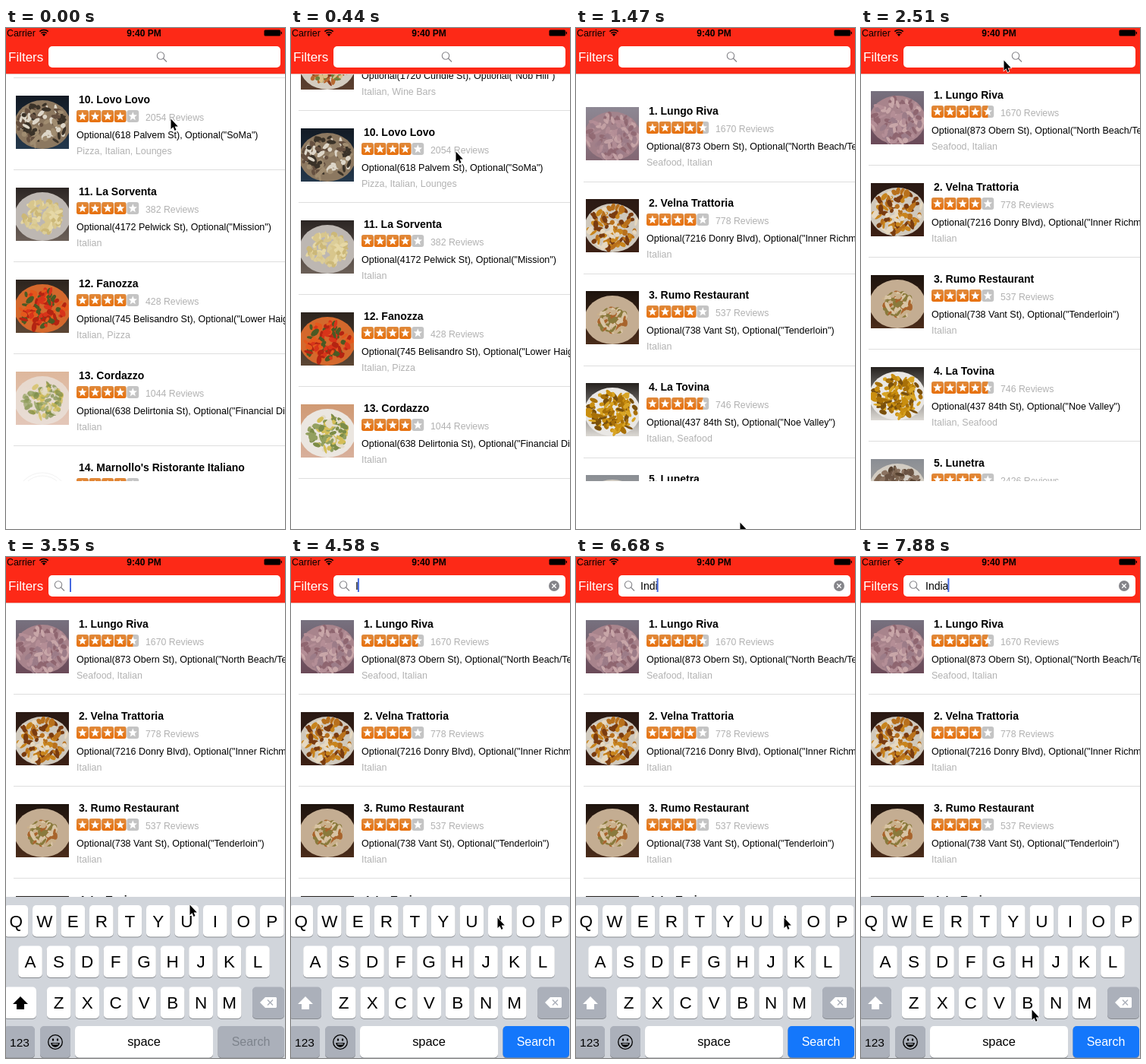
An HTML page with a canvas for the animation above (8 s loop, 368 px wide and 659 px high).

```html
<!DOCTYPE html>
<html lang="en">
<head>
<meta charset="utf-8">
<title>Restaurant search</title>
<style>
html, body { margin: 0; width: 368px; height: 659px; overflow: hidden; background: #fff; }
canvas { display: block; }
</style>
</head>
<body>
<canvas id="stage" width="368" height="659"></canvas>
<script>
const ctx = document.getElementById('stage').getContext('2d');
const LOOP = 8000, STEP = 148.5, ROW = 121, NAV = 60, LIST_END = 596;
const RED = '#fd2917', GREY = '#b2b2b2';

// name, reviews, rating, street, area, categories, photo: food radius, top, bottom, plate, food colours
const ROWS = [
  ['Lungo Riva', 1670, 4.5, '873 Obern St', 'North Beach/Telegraph Hill', 'Seafood, Italian', '34 #77717f #6b4a58 #a8848c #b48e96 #c8a6a8 #8f6670 #9c7c88'],
  ['Velna Trattoria', 778, 4, '7216 Donry Blvd', 'Inner Richmond', 'Italian', '33 #2a1a14 #3c2014 #cfc8bc #b8701c #7a3c10 #c8841c #e6d8c0'],
  ['Rumo Restaurant', 537, 4, '738 Vant St', 'Tenderloin', 'Italian', '18 #1e140e #4a2c1a #c4ad92 #c9b08c #a8642c #8a7a3c #d8c4a4'],
  ['La Tovina', 746, 4.5, '437 84th St', 'Noe Valley', 'Italian, Seafood', '32 #25211e #dcd9d4 #e9e7e4 #c98e10 #d8a424 #7a500c #a87008'],
  ['Lunetra', 2426, 4, '2366 Bolenira St', 'Mission', 'Italian, Bars, Pizza', '31 #8a8e94 #b9b2a8 #d2ccc2 #6b5444 #8a7260 #55402f #7c6450'],
  ['Valtorni Ristorante', 613, 4.5, '738 Obern St', 'North Beach/Telegraph Hill', 'Pizza, Italian', '33 #6c7078 #7a4c2c #d9bf8c #ead9ac #f2e6c6 #c89a5c #e4cc94'],
  ['Orvana Rosticceria', 96, 4.5, '263 McTindrill St', 'Civic Center', 'Italian, American (Traditional), Breakfast & Brunch', '31 #8c9098 #3a2018 #5c3826 #c89448 #84502c #6a7444 #4a2a1c'],
  ['Casa Verluna', 318, 4, '945 Tolmen St', 'Marina', 'Italian', '27 #4a3424 #6a4a30 #d8d0c4 #c08a40 #a85a24 #e0cc9c #6c7438'],
  ['Pontarello', 862, 4, '1720 Cundle St', 'Nob Hill', 'Italian, Wine Bars', '27 #3c2c24 #5c4030 #d4ccc0 #b86a30 #8a3c1c #dcc088 #70803c'],
  ['Lovo Lovo', 2054, 4, '618 Palvem St', 'SoMa', 'Pizza, Italian, Lounges', '32 #121a24 #24384c #8c7860 #ddd6c8 #3a3228 #a08c70 #655040'],
  ['La Sorventa', 382, 4, '4172 Pelwick St', 'Mission', 'Italian', '25 #2c2624 #6c6058 #bdb7b2 #d8c68c #e6d8a6 #ccb878 #dccd98'],
  ['Fanozza', 428, 4, '745 Belisandro St', 'Lower Haight', 'Italian, Pizza', '31 #2c241e #5c4634 #d4682c #d8341a #e4581c #4a5a24 #b42412'],
  ['Cordazzo', 1044, 4, '638 Delirtonia St', 'Financial District', 'Italian', '26 #d09a74 #d8b09c #ebe6e0 #7c8c48 #d4be58 #e4dcc8 #93a060'],
  ["Marnollo's Ristorante Italiano", 903, 4, '417 Tarnum St', 'North Beach', 'Italian', ''],
];

// list offset at each step; rests at 0 after the bounce
const SCROLL = [1083, 1078, 1070, 1040, 990, 880, 600, 306, 70, -45, -21.5, -8, -3, -1, 0];
// pointer: step, x, y
const POINTER = [[10, 216, 650], [12, 212, 560], [14, 196, 90], [15, 190, 38], [16, 188, 42], [19, 188, 42],
  [21, 192, 80], [24, 242, 457], [26, 272, 474], [30, 272, 474], [33, 256, 582], [35, 256, 582], [37, 109, 523],
  [39, 107, 522], [43, 272, 474], [45, 274, 474], [48, 50, 522], [49, 32, 524], [50, 32, 524], [53, 225, 595]];
const WORD = 'India', TYPED = [29, 35, 39, 44, 50];
const KEYS = [['QWERTYUIOP', 13.3, 458], ['ASDFGHJKL', 32, 511.5], ['ZXCVBNM', 69.7, 565.5]];

const clamp = v => Math.max(0, Math.min(1, v));

function text(str, x, y, size, color, align = 'left', weight = '') {
  ctx.font = `${weight} ${size}px "Liberation Sans", Arial, sans-serif`;
  ctx.textAlign = align;
  ctx.fillStyle = color;
  ctx.fillText(str, x, y);
}
function box(x, y, w, h, r, color) {
  ctx.fillStyle = color;
  ctx.beginPath();
  ctx.roundRect(x, y, w, h, r);
  ctx.fill();
}
function oval(x, y, rx, ry, color, turn = 0) {
  ctx.fillStyle = color;
  ctx.beginPath();
  ctx.ellipse(x, y, rx, ry, turn, 0, 7);
  ctx.fill();
}
function poly(points, fill) {
  ctx.beginPath();
  points.forEach(([x, y]) => ctx.lineTo(x, y));
  ctx.closePath();
  ctx.fillStyle = fill;
  ctx.fill();
}
function line(color, width, ...points) {
  ctx.strokeStyle = color;
  ctx.lineWidth = width;
  ctx.beginPath();
  points.forEach(([x, y]) => ctx.lineTo(x, y));
  ctx.stroke();
}
function arc(x, y, r, from, to, color, width) {
  ctx.strokeStyle = color;
  ctx.lineWidth = width;
  ctx.beginPath();
  ctx.arc(x, y, r, from, to);
  ctx.stroke();
}
function clipped(x, y, w, h, draw) {
  ctx.save();
  ctx.beginPath();
  ctx.rect(x, y, w, h);
  ctx.clip();
  draw();
  ctx.restore();
}

function scrollAt(step) { return SCROLL[step] ?? 0; }

// step at which row n comes into view
function enterStep(n) {
  if (n > 12) return n === 13 ? -1.9 : -0.5;
  const top = ROW * n, k = SCROLL.findIndex(v => v < top);
  return k < 1 ? -9 : k - (top - SCROLL[k]) / (SCROLL[k - 1] - SCROLL[k]);
}

function pointerAt(step) {
  if (step < 10) return [217, Math.min(650, 119 + SCROLL[0] - scrollAt(step))];
  const i = POINTER.findIndex(p => p[0] >= step);
  if (i < 0) return POINTER.at(-1).slice(1);
  if (!i) return POINTER[0].slice(1);
  const [s0, x0, y0] = POINTER[i - 1], [s1, x1, y1] = POINTER[i];
  const f = (step - s0) / (s1 - s0), e = f * f * (3 - 2 * f);
  return [x0 + (x1 - x0) * e, y0 + (y1 - y0) * e];
}

function photo(x, y, look, seed) {
  clipped(x, y, 70, 70, () => {
    if (!look) {
      [34, 30, 22].forEach(r => arc(x + 35, y + 46, r, 0, 7, '#999', 1));
      return;
    }
    const [radius, top, bottom, plate, ...food] = look.split(' ');
    const shade = ctx.createLinearGradient(0, y, 0, y + 70);
    shade.addColorStop(0, top);
    shade.addColorStop(1, bottom);
    box(x, y, 70, 70, 0, shade);
    oval(x + 35, y + 38, 37, 32, plate);
    let n = seed * 7919;
    const rnd = () => (n = (n * 16807 + 11) % 2147483647) / 2147483647;
    rnd();
    for (let i = 0; i < 110; i++) {
      const a = rnd() * 6.28, d = radius * Math.sqrt(rnd());
      oval(x + 35 + d * Math.cos(a), y + 38 + 0.85 * d * Math.sin(a),
        2.5 + rnd() * 4, 1.5 + rnd() * 2, food[i % food.length], rnd() * 3);
    }
  });
}

function star(x, y, fill) {
  box(x, y, 15.8, 16, 3, '#c4c4c4');
  if (fill > 0) clipped(x, y, 16 * fill, 16, () => {
    const shade = ctx.createLinearGradient(0, y, 0, y + 16);
    shade.addColorStop(0, '#e08a3c');
    shade.addColorStop(1, '#e8700c');
    box(x, y, 15.8, 16, 3, shade);
  });
  const tips = Array.from({ length: 10 }, (_, i) => {
    const r = i % 2 ? 2.6 : 6, a = i * Math.PI / 5;
    return [x + 7.9 + r * Math.sin(a), y + 8.3 - r * Math.cos(a)];
  });
  poly(tips, '#fff');
}

function row(i, top, step) {
  const [name, reviews, rating, street, area, kinds, look] = ROWS[i];
  const y = Math.floor(top);
  ctx.globalAlpha = clamp((step - enterStep(i + 1) - 0.2) / 2.4);
  photo(13, y + 23, look, i + 1);
  ctx.globalAlpha = 1;
  text(`${i + 1}. ${name}`, 96, y + 33, 14, '#000', 'left', 'bold');
  for (let s = 0; s < 5; s++) star(93 + s * 16.6, y + 42, clamp(rating - s));
  text(`${reviews} Reviews`, 184, y + 56, 12.3, GREY);
  text(`Optional(${street}), Optional("${area}")`, 93, y + 79, 12.5, '#000');
  text(kinds, 93, y + 100, 12.5, GREY);
  box(10, Math.round(top + 120), 358, 1, 0, '#dedede');
}

function list(step) {
  const offset = scrollAt(step);
  clipped(0, NAV, 368, LIST_END - NAV, () => {
    ROWS.forEach((_, i) => {
      const y = NAV + i * ROW - offset;
      if (y < LIST_END && y + ROW > NAV) row(i, y, step);
    });
  });
}

function statusBar() {
  text('Carrier', 1, 11, 12.4, '#000');
  [8.5, 5.5].forEach(r => arc(50, 11, r, -2.3, -0.84, '#000', 1.7));
  poly([[50, 11], [47.6, 8.2], [50, 7.3], [52.4, 8.2]], '#000');
  text('9:40 PM', 182, 11, 12, '#000', 'center', 'bold');
  box(340.5, 2.5, 21.5, 8, 1.5, '#000');
  box(362.7, 4.8, 1.3, 3.4, 0.5, '#000');
}

function navBar(step, focus) {
  box(0, 0, 368, NAV, 0, RED);
  box(0, NAV, 368, 1, 0, '#e9b5b0');
  statusBar();
  text('Filters', 3, 44, 17, '#fff');
  box(56, 24, 306, 28, 5, '#fff');
  const x = 204 - 135 * focus;
  arc(x, 36.5, 4.7, 0, 7, '#85858a', 1.1);
  line('#85858a', 1.3, [x + 3.5, 40], [x + 8, 44.5]);

  const typed = TYPED.filter(s => s <= step);
  const word = WORD.slice(0, typed.length);
  text(word, 85, 42.5, 14, '#000');
  if (focus === 1 && (step - (typed.at(-1) ?? 21)) % 7 < 4)
    box(84 + ctx.measureText(word).width, 28, 2, 18, 0, '#4669e0');
  if (word) {
    oval(347, 38, 7, 7, '#85858a');
    line('#fff', 1.3, [344.3, 35.3], [349.7, 40.7]);
    line('#fff', 1.3, [349.7, 35.3], [344.3, 40.7]);
  }
}

function key(x, y, w, color) {
  box(x, y + 1, w, 41.5, 5, '#888b90');
  box(x, y, w, 41.5, 5, color);
}

function popup(letter) {
  const [chars, x0, y] = KEYS.find(k => k[0].includes(letter));
  const x = x0 + chars.indexOf(letter) * 37.5;
  ctx.shadowColor = '#0006';
  ctx.shadowBlur = 3;
  box(x - 29, y - 58, 58, 52, 9, '#fff');
  ctx.shadowBlur = 0;
  poly([[x - 29, y - 14], [x + 29, y - 14], [x + 16, y + 6], [x + 16, y + 38], [x - 16, y + 38], [x - 16, y + 6]], '#fff');
  box(x - 16, y + 20, 32, 21.5, 5, '#fff');
  text(letter, x, y - 20, 34, '#000', 'center');
}

function keyboard(step, shown) {
  const dark = '#abb0ba', empty = step < TYPED[0];
  ctx.save();
  ctx.translate(0, (1 - shown) * 212);
  box(0, 447, 368, 212, 0, '#d1d5db');
  for (const [chars, x0, y] of KEYS) [...chars].forEach((c, i) => {
    const x = x0 + i * 37.5;
    key(x - 15.8, y, 31.6, '#fff');
    text(c, x, y + 28.5, 22.5, '#000', 'center');
  });

  key(-3, 565.5, 43, empty ? '#fff' : dark);
  poly([[19, 578], [29, 588], [24, 588], [24, 595], [14, 595], [14, 588], [9, 588]], empty ? '#000' : '#fff');

  key(325, 565.5, 42, dark);
  poly([[335, 586], [342, 579], [356, 579], [357, 580], [357, 592], [356, 593], [342, 593]], '#fff');
  line(dark, 1.5, [345, 582.5], [352, 589.5]);
  line(dark, 1.5, [352, 582.5], [345, 589.5]);

  key(-3, 617, 41, dark);
  text('123', 18, 643.5, 15.5, '#000', 'center');
  key(45, 617, 40, dark);
  arc(65, 638, 9.3, 0, 7, '#000', 1.3);
  oval(62, 635, 1.2, 1.8, '#000');
  oval(68, 635, 1.2, 1.8, '#000');
  ctx.fillStyle = '#000';
  ctx.beginPath();
  ctx.arc(65, 639, 5.8, 0, Math.PI);
  ctx.fill();
  oval(65, 640.6, 4.2, 0.9, dark);

  key(91, 617, 182, '#fff');
  text('space', 182, 643, 16.4, '#000', 'center');
  key(279.5, 617, 87.5, empty ? dark : '#1477fb');
  text('Search', 323, 643, 16, empty ? '#7d838c' : '#fff', 'center');

  const pressed = TYPED.indexOf(step + 1);
  if (pressed >= 0) popup(WORD[pressed].toUpperCase());
  ctx.restore();
}

function pointer(x, y) {
  const shape = [[0, 0], [0, 13.5], [3, 10.8], [5, 15.5], [7, 14.6], [5.1, 10], [9.3, 10]];
  const at = shape.map(([dx, dy]) => [x + 0.5 + dx, y + 0.5 + dy]);
  line('#fff', 1.4, ...at, at[0]);
  poly(at, '#000');
}

function draw(now) {
  const step = Math.floor((now % LOOP + 20) / STEP);
  const rise = clamp((step - 18) / 3), focus = 1 - (1 - rise) ** 2;
  box(0, 0, 368, 659, 0, '#fff');
  list(step);
  navBar(step, focus);
  if (focus > 0) keyboard(step, focus);
  pointer(...pointerAt(step));
}

let start;
function tick(now) {
  start ??= now;
  draw(now - start);
  requestAnimationFrame(tick);
}
requestAnimationFrame(tick);
</script>
</body>
</html>
```
